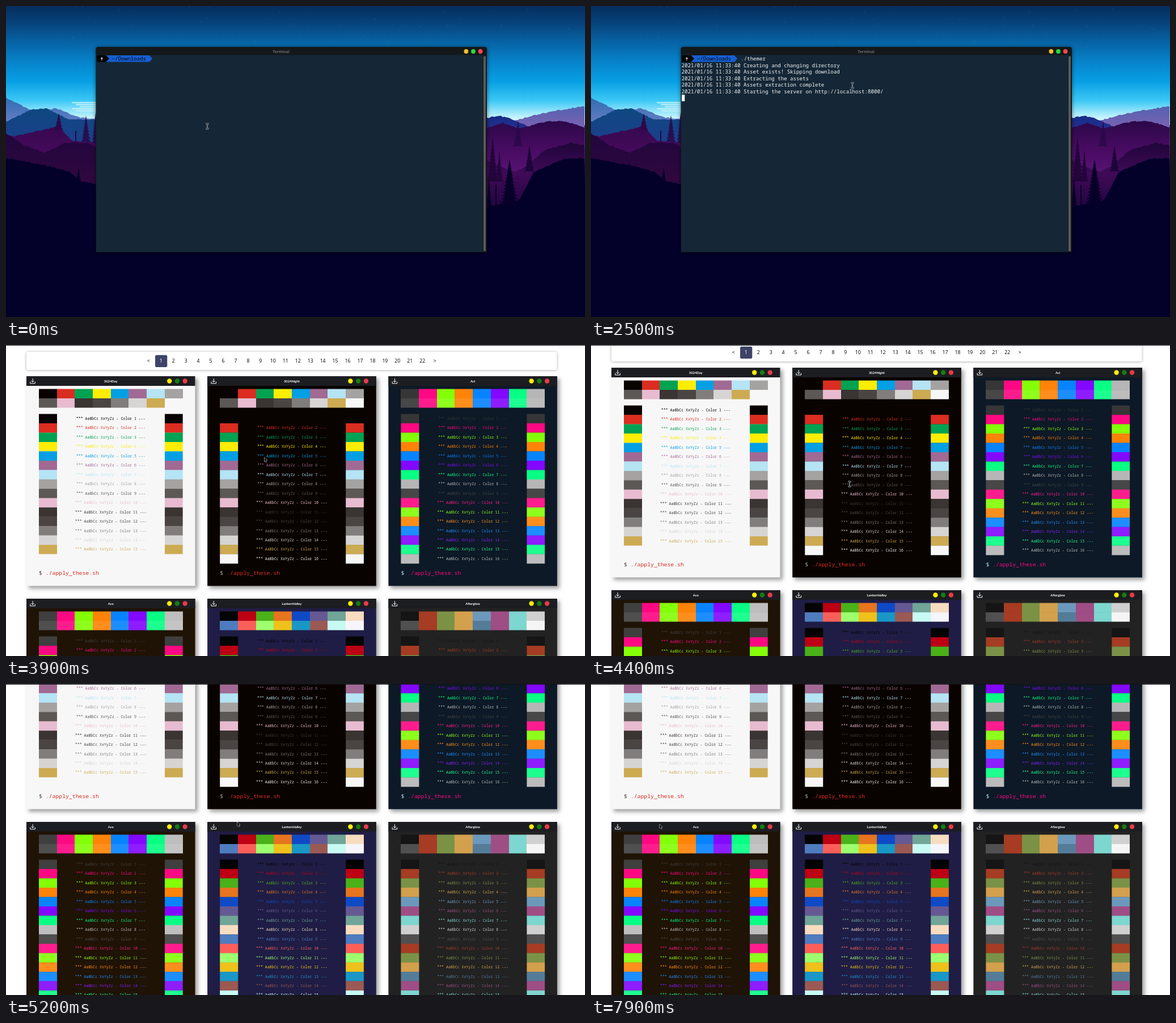
An HTML page with a canvas for the animation above (8000 ms loop, 1021x548 px).

```html
<!DOCTYPE html>
<html lang="en">
<head>
<meta charset="utf-8">
<title>Terminal themes</title>
<style>
html, body { margin: 0; width: 100%; height: 100%; overflow: hidden; background: #fff; }
canvas { display: block; }
</style>
</head>
<body>
<canvas id="stage" width="1021" height="548"></canvas>
<script>
const W = 1021, H = 548, LOOP = 8000, STEP = 100;
const ctx = document.getElementById('stage').getContext('2d');
const MONO = '"Noto Sans Mono", "DejaVu Sans Mono", monospace';
const SANS = '"Noto Sans", "Open Sans", sans-serif';

function rect(x, y, w, h, color) {
  ctx.fillStyle = color;
  ctx.fillRect(x, y, w, h);
}

function round(x, y, w, h, r, color) {
  ctx.fillStyle = color;
  ctx.beginPath();
  ctx.roundRect(x, y, w, h, r);
  ctx.fill();
}

function dot(x, y, r, color) {
  ctx.fillStyle = color;
  ctx.beginPath();
  ctx.arc(x, y, r, 0, Math.PI * 2);
  ctx.fill();
}

function poly(pts, color) {
  ctx.fillStyle = color;
  ctx.beginPath();
  pts.forEach(([x, y]) => ctx.lineTo(x, y));
  ctx.closePath();
  ctx.fill();
}

function text(str, x, y, font, color, align = 'left') {
  ctx.font = font;
  ctx.fillStyle = color;
  ctx.textAlign = align;
  ctx.fillText(str, x, y);
}

function shadowed(color, blur, dx, dy, draw) {
  ctx.save();
  ctx.shadowColor = color;
  ctx.shadowBlur = blur;
  ctx.shadowOffsetX = dx;
  ctx.shadowOffsetY = dy;
  draw();
  ctx.restore();
}

function fade(y0, y1, ...colors) {
  const g = ctx.createLinearGradient(0, y0, 0, y1);
  colors.forEach((c, i) => g.addColorStop(i / (colors.length - 1), c));
  return g;
}

function seeded(seed) {
  return () => (seed = seed * 16807 % 2147483647) / 2147483647;
}

const clamp = v => Math.max(0, Math.min(1, v));

// Keys are [time, ...values]; the result is interpolated between them.
function track(keys, t) {
  let i = 0;
  while (i < keys.length - 1 && keys[i + 1][0] <= t) i++;
  const a = keys[i], b = keys[i + 1];
  if (!b || t <= a[0]) return a.slice(1);
  const k = (t - a[0]) / (b[0] - a[0]);
  return a.slice(1).map((v, n) => v + (b[n + 1] - v) * k);
}

// ---- Wallpaper ----

// A rough skyline through a few key points, filled down to the ground.
function ridge(pts, color) {
  const rnd = seeded(pts[0][1] * 31);
  const x0 = pts[0][0], x1 = pts[pts.length - 1][0];
  const out = [[x0, 360]];
  for (let x = x0; x <= x1; x += 3) out.push([x, track(pts, x)[0] + rnd() * 2 - 1]);
  poly([...out, [x1, 360]], color);
}

function tree(x, top, base, half, color) {
  const rows = Math.max(5, Math.round((base - top) / 6));
  const left = [], right = [];
  for (let i = 1; i <= rows; i++) {
    const y = top + (base - top) * i / rows, w = half * i / rows;
    left.push([x - w, y], [x - w * 0.55, y - 1]);
    right.unshift([x + w * 0.55, y - 1], [x + w, y]);
  }
  poly([[x, top], ...left, ...right], color);
}

function wallpaper() {
  rect(0, 0, W, 210, fade(0, 200, '#052d5d', '#07467f', '#0766a8', '#0784cb', '#08a0e4', '#3cc8f5', '#d5f9ff'));
  rect(0, 210, W, H - 210, '#03002a');

  const rnd = seeded(77);
  for (let i = 0; i < 60; i++) rect(rnd() * W, rnd() * 75, 0.9, 0.9, `rgba(210,235,255,${0.1 + rnd() * 0.3})`);
  for (let i = 0; i < 5; i++) round(116 + i % 3 * 7, 169 + i * 3.6, 45, 2.4, 1, 'rgba(205,246,252,.75)');

  // left side, far to near
  ridge([[0, 162], [25, 174], [48, 186], [88, 180], [128, 196], [160, 200]], fade(162, 210, '#2f6cb2', '#6b80c6'));
  ridge([[0, 204], [45, 182], [72, 181], [112, 200], [160, 200]], fade(181, 240, '#0d4880', '#1c3f8c'));
  ridge([[0, 227], [14, 230], [92, 212], [118, 238], [160, 240]], fade(212, 260, '#36084f', '#470a5c'));
  tree(93, 190, 219, 8, '#30074b');
  tree(141, 193, 240, 9, '#25104f');
  tree(158, 188, 242, 7, '#25104f');
  rect(122, 220, 2, 20, '#20094a');
  ridge([[0, 225], [30, 244], [68, 259], [105, 241], [145, 241], [160, 250]], fade(225, 310, '#20063d', '#30083f'));
  tree(128, 286, 314, 6, '#08002b');
  ridge([[0, 268], [75, 282], [112, 292], [130, 308], [160, 314]], '#03002a');

  // right side, far to near
  ridge([[885, 205], [925, 194], [960, 186], [1022, 176]], fade(176, 215, '#5461ae', '#7a63b4'));
  ridge([[846, 198], [868, 193], [885, 197], [930, 216]], fade(192, 225, '#142c87', '#2c2f91'));
  ridge([[846, 215], [876, 206], [903, 216], [955, 203], [985, 203], [1022, 214]],
    fade(201, 305, '#2a0848', '#480b62', '#5c1578'));
  tree(903, 202, 248, 9, 'rgba(40,7,72,.75)');
  ridge([[846, 272], [895, 292], [914, 285], [950, 254], [995, 241], [1022, 246]],
    fade(241, 350, '#1f0539', '#400a58', '#240540'));
  tree(858, 231, 310, 11, '#23053b');
  tree(870, 255, 310, 7, '#23053b');
  tree(923, 246, 292, 9, '#1c0538');
  ridge([[846, 354], [905, 342], [931, 292], [985, 269], [1022, 268]], '#03002a');
  tree(888, 271, 353, 17, '#070028');
  tree(852, 305, 353, 5, '#070028');
  rect(863, 315, 2, 38, '#070028');
}

// ---- Terminal ----

const TERM = '500 9.14px ' + MONO;
const LOG = ['Creating and changing directory', 'Asset exists! Skipping download',
  'Extracting the assets', 'Assets extraction complete',
  'Starting the server on http://localhost:8000/'];

function terminal(t) {
  shadowed('rgba(0,0,0,.55)', 7, 0, 1, () => round(158.5, 72, 689.5, 362, [4, 4, 0, 0], '#14181a'));
  rect(159, 86.5, 682, 346.5, '#152736');
  rect(842, 88.5, 4, 343.5, '#5b5b59');
  text('Terminal', 485, 82.6, 'bold 6.7px ' + SANS, '#686c6e', 'center');
  ['#f3bd32', '#29d93e', '#fb464e'].forEach((c, i) => dot(811.4 + i * 12.6, 80, 3.9, c));

  poly([[176, 87], [253, 87], [258, 92.8], [253, 98.6], [176, 98.6]], '#155fd3');
  poly([[160, 87], [176.5, 87], [182, 92.8], [176.5, 98.6], [160, 98.6]], '#000');
  text('✝', 169, 95.8, '8px "DejaVu Sans", sans-serif', '#fff', 'center');
  text('~/Downloads', 186.8, 96.1, TERM, '#05080c');

  // keys arrive in three short bursts
  const typed = [500, 600, 900, 900, 1000, 1300, 1300, 1300].filter(k => k <= t).length;
  text('./themer'.slice(0, typed), 264.2, 96.1, TERM, '#f2f4f5');
  if (t >= 1500) {
    LOG.forEach((line, i) =>
      text('2021/01/16 11:33:40 ' + line, 159.5, 107.7 + i * 11.55, TERM, '#f2f4f5'));
    rect(160, 156.3, 5.3, 11.5, '#fff');
  }
}

function overlay(alpha) {
  ctx.save();
  ctx.globalAlpha = alpha;
  shadowed('rgba(0,0,0,.6)', 9, 0, 1, () => rect(-20, -40, 690, 363, '#14181a'));
  rect(0, 0, 664, 322, '#152736');
  rect(665, 0, 3.5, 321, '#5b5b59');
  ctx.restore();
}

// ---- Theme page ----

const hex = s => s.split(' ').map(c => '#' + c);

function lighten(color, k) {
  const n = parseInt(color.slice(1), 16);
  const rgb = [n >> 16, n >> 8 & 255, n & 255].map(v => Math.round(v + (255 - v) * k));
  return `rgb(${rgb})`;
}

function neon(black, white) {
  const base = hex(`${black} ff0883 83ff08 ff8308 0883ff 8308ff 08ff83 ${white}`);
  return [...base, ...base.map(c => lighten(c, 0.085))];
}

const ash = hex('090300 db2d20 01a252 fded02 01a0e4 a16a94 b5e4f4 a5a2a2 5c5855 e8bbd0 3a3432 4a4543 807d7c d6d5d4 cdab53 f7f7f7');
const dusk = hex('151515 a53c23 7b9246 d3a04d 6c99bb 9f4e85 7dd6cf d0d0d0');
const valley = hex('050404 bd0013 4ab118 e7741e 0f4ac6 665993 70a598 f8dcc0 4e7cbf fc5f5a 9eff6e efc11a 1997c6 9b5953 c8faf4 f6f5fb');

const themes = [
  { name: '3024Day', bg: '#f7f7f7', fg: '#4a4543', pal: ash },
  { name: '3024Night', bg: '#090300', fg: '#a5a2a2', pal: ash },
  { name: 'Aci', bg: '#0d1926', fg: '#b4e1fd', pal: neon('363636', 'b6b6b6') },
  { name: 'Aco', bg: '#1f1305', fg: '#b4e1fd', pal: neon('3f3f3f', 'bebebe') },
  { name: 'LanternValley', bg: '#1f1d45', fg: '#f8dcc0', pal: valley },
  { name: 'Afterglow', bg: '#222222', fg: '#d0d0d0',
    pal: [...dusk, '#505050', ...dusk.slice(1, 4), '#547c99', ...dusk.slice(5, 7), '#f5f5f5'] }
];

function downloadIcon(x, y) {
  ctx.strokeStyle = '#fff';
  ctx.lineWidth = 1;
  ctx.beginPath();
  ctx.moveTo(x - 4.3, y + 1);
  ctx.lineTo(x - 4.3, y + 4.3);
  ctx.lineTo(x + 4.3, y + 4.3);
  ctx.lineTo(x + 4.3, y + 1);
  ctx.moveTo(x, y - 4.5);
  ctx.lineTo(x, y + 2);
  ctx.moveTo(x - 2.5, y - 0.5);
  ctx.lineTo(x, y + 2);
  ctx.lineTo(x + 2.5, y - 0.5);
  ctx.stroke();
}

function card({ name, bg, fg, pal }, x, y) {
  shadowed('rgba(0,0,0,.38)', 7, 4, 4, () => rect(x, y, 297.5, 369.5, bg));
  rect(x, y, 297.5, 17, '#1c1d21');
  downloadIcon(x + 11, y + 8.5);
  text(name, x + 148.7, y + 10.6, 'bold 5.8px Lato, sans-serif', '#fff', 'center');
  ['#ffee08', '#127f12', '#e93a48'].forEach((c, i) => dot(x + 252.2 + i * 13.75, y + 8.5, 4.2, c));

  const cw = 253.5 / 8, rh = 16.47;
  pal.forEach((c, i) => {
    const left = Math.round(x + 22 + i % 8 * cw);
    const right = Math.round(x + 22 + (i % 8 + 1) * cw);
    rect(left, y + 22.5 + (i >> 3) * 16.5, right - left, 16.5, c);

    const sy = y + 66.5 + i * rh;
    rect(x + 22, sy, 32, rh + 0.2, c);
    rect(x + 244, sy, 31.7, rh + 0.2, c);
    text(`*** AaBbCc XxYyZz - Color ${i + 1} ---`, x + 148.7, sy + 10.4, '6.56px ' + MONO, c, 'center');
  });
  const cmd = '9.8px ' + MONO;
  text('$', x + 22, y + 350.4, cmd, fg);
  text('./apply_these.sh', x + 33.8, y + 350.4, cmd, pal[1]);
}

function page(scroll, loaded) {
  rect(0, 0, W, H, '#fff');
  shadowed('rgba(0,0,0,.35)', 4, 0, 0.5,
    () => round(36, 12 - scroll, loaded ? 935.5 : 944, 32, 3, '#fff'));
  const y = 28 - scroll;
  if (loaded) {
    round(263, y - 10.3, 21.3, 21.3, 2.5, '#3d4468');
    for (let i = 0; i < 24; i++) {
      const label = i === 0 ? '<' : i === 23 ? '>' : i;
      text(label, 251.3 + i * 21.95, y + 3.2, '8.7px ' + SANS, i === 1 ? '#fff' : '#111', 'center');
    }
    themes.forEach((th, i) => card(th, 36 + i % 3 * 319.2, 55 - scroll + Math.floor(i / 3) * 392));
  } else {
    text('<', 497, y + 3, '8px ' + SANS, '#111', 'center');
    text('>', 519, y + 3, '8px ' + SANS, '#111', 'center');
  }
  rect(0, 0, W, 1, '#101214');
}

// ---- Pointer ----

const path = [[1900, 355, 212], [2000, 472, 190], [2200, 485, 155], [2400, 468, 117],
  [2500, 461, 140], [3600, 461, 140], [3700, 455, 151], [4100, 456, 245], [4900, 456, 245],
  [5200, 408, 243], [5400, 368, 246], [5800, 366, 249], [6500, 313, 239], [7600, 313, 239],
  [7900, 121, 247]];

function ibeam(x, y) {
  ctx.beginPath();
  for (const end of [-4.3, 4.3]) {
    ctx.moveTo(x - 2.5, y + end);
    ctx.lineTo(x + 2.5, y + end);
    ctx.moveTo(x, y);
    ctx.lineTo(x, y + end);
  }
  for (const [width, color] of [[2.2, '#c9ced1'], [1, '#15191c']]) {
    ctx.lineWidth = width;
    ctx.strokeStyle = color;
    ctx.stroke();
  }
}

function arrow(x, y) {
  ctx.save();
  ctx.translate(x, y);
  ctx.strokeStyle = '#e8e8e8';
  ctx.lineWidth = 1;
  poly([[0, 0], [0, 7.2], [1.7, 5.7], [2.9, 8.4], [4.1, 7.9], [2.9, 5.2], [5, 5]], '#08090a');
  ctx.stroke();
  ctx.fill();
  ctx.restore();
}

function pointer(t) {
  if (t >= 500 && t < 2000) return;
  const [x, y] = track(path, t);
  const overText = t < 3700 || (t >= 4100 && t < 4800) || (t >= 6200 && t < 7200);
  (overText ? ibeam : arrow)(x, y);
}

// ---- Timeline ----

function scrollAt(t) {
  const k = clamp((t - 4300) / 500), a = k ** 1.83, b = (1 - k) ** 1.83;
  return 204 * a / (a + b);
}

function draw(t) {
  if (t < 3700) {
    wallpaper();
    terminal(t);
  } else {
    page(scrollAt(t), t >= 3800);
    const alpha = Math.min(clamp((t - 5800) / 400), clamp((7500 - t) / 400));
    if (alpha > 0) overlay(alpha);
  }
  pointer(t);
}

let shown = -1;
function tick() {
  const t = Math.floor(performance.now() % LOOP / STEP) * STEP;
  if (t !== shown) draw(shown = t);
  requestAnimationFrame(tick);
}
tick();
</script>
</body>
</html>
```
